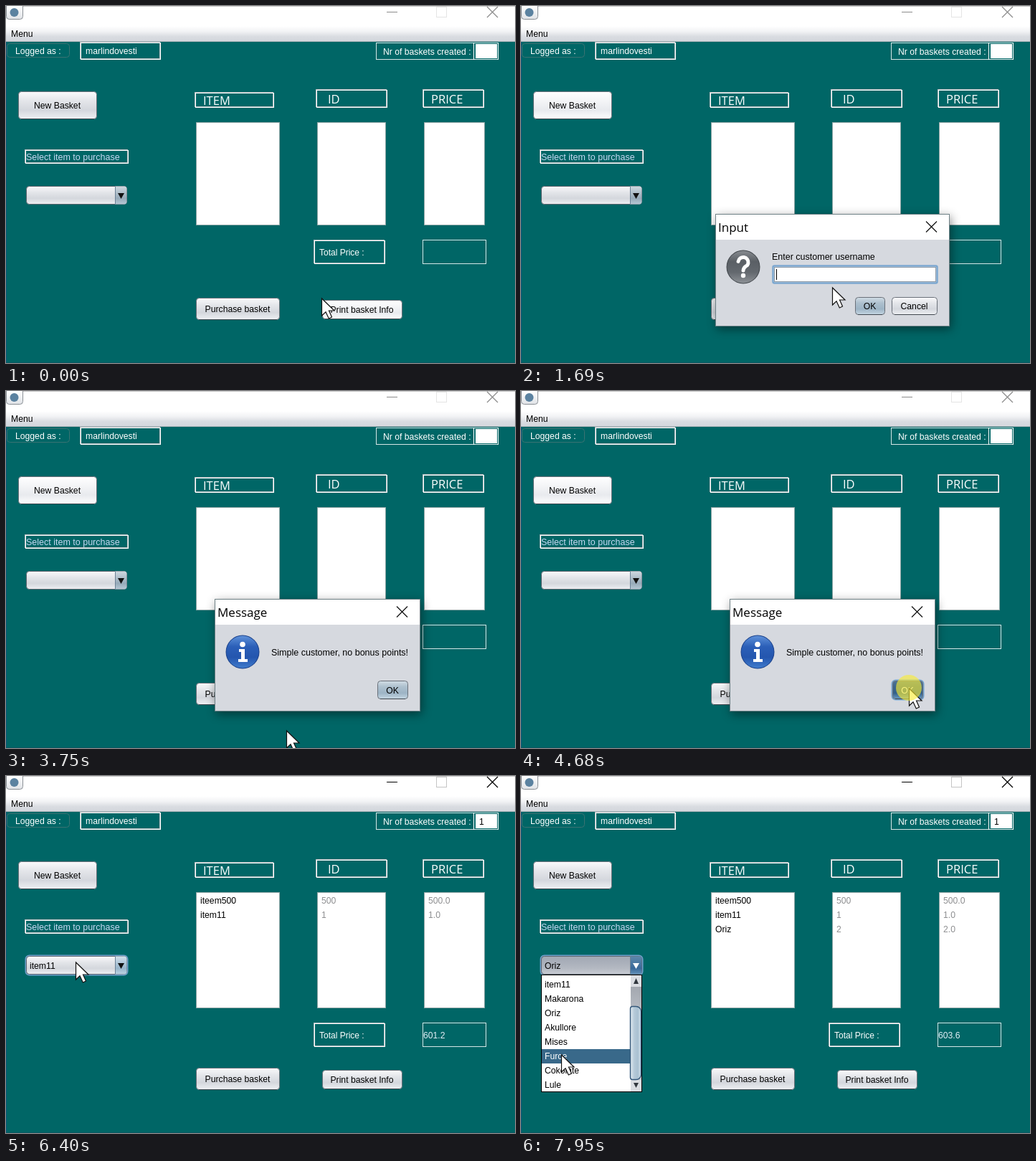
Recreate the animation shown at these times as an HTML page with a canvas. Size 710 px wide and 498 px high, loop 8 s.

```html
<!DOCTYPE html>
<html lang="en">
<head>
<meta charset="utf-8">
<title>Basket</title>
<style>
html, body { margin: 0; height: 100%; overflow: hidden; background: #066; }
canvas { display: block; }
</style>
</head>
<body>
<canvas id="stage" width="710" height="498"></canvas>
<script>
const W = 710, H = 498, LOOP = 8000;
const main = document.getElementById('stage').getContext('2d');
const layer = Object.assign(document.createElement('canvas'), { width: W, height: H }).getContext('2d');
let g = main;

const SANS = '"Liberation Sans", Arial, sans-serif';
const HEAD = '"Open Sans", "Noto Sans", sans-serif';
const TEAL = '#006666', BODY = '#d6d9df';
const LOOKS = {
  plain: ['#fbfbfc', '#e4e6ea', '#d4d7dd', '#eff1f4'],
  hover: ['#ffffff', '#f4f5f7', '#e8eaee', '#ffffff'],
  pressed: ['#a3a9b4', '#a9afba', '#b4b9c2', '#c8ccd4'],
  primary: ['#d3dee6', '#adc0ce', '#9db4c5', '#c7d8e4'],
  primaryDown: ['#4d7597', '#3c6489', '#33608a', '#6d9cc2'],
  arrow: ['#d0dae1', '#b3c2cd', '#96aab9', '#b9cbd8'],
  arrowFocus: ['#d5e2ec', '#b4cadb', '#98b5ca', '#bfd6e6'],
  arrowDown: ['#5f88ab', '#4d7aa2', '#39699a', '#6493bb']
};

// time, x, y of the pointer tip
const PATH = [
  [0, 440, 408], [70, 440, 408], [480, 86, 142], [600, 86, 143], [740, 88, 167], [900, 88, 167],
  [1690, 434, 393], [1910, 434, 393], [2760, 434, 398], [3300, 434, 398], [3800, 390, 476],
  [4500, 541, 415], [5000, 541, 415], [5630, 100, 263], [5720, 100, 264], [6130, 90, 331],
  [6190, 90, 331], [6360, 97, 260], [6540, 97, 260], [6790, 88, 371], [7020, 88, 371],
  [7340, 98, 262], [7500, 98, 263], [7730, 60, 380], [7900, 56, 389], [8000, 56, 389]
];
const CLICKS = [[490, 610], [4600, 4780], [5630, 5740], [6120, 6220], [6460, 6560], [6950, 7040], [7430, 7530]];
const POPUPS = [[5700, 6180], [6550, 7010], [7510, 8000]];
const ITEMS = ['iteem500', 'Buke', 'item11', 'Makarona', 'Oriz', 'Akullore', 'Mises', 'Furce', 'Cokolate', 'Lule'];
const BOUGHT = [
  { at: 4790, pick: 0, id: '500', price: '500.0', total: '600.0' },
  { at: 6190, pick: 2, id: '1', price: '1.0', total: '601.2' },
  { at: 7010, pick: 4, id: '2', price: '2.0', total: '603.6' }
];
const USER = 'nea', KEYS = [2060, 2295, 2530];

const within = (t, [a, b]) => t >= a && t < b;
const clamp = v => Math.max(0, Math.min(1, v));

function pointer(t) {
  const i = PATH.findIndex(p => p[0] > t), [t0, x0, y0] = PATH[i - 1], [t1, x1, y1] = PATH[i];
  const k = (t - t0) / (t1 - t0), e = k * k * (3 - 2 * k);
  return [Math.round(x0 + (x1 - x0) * e), Math.round(y0 + (y1 - y0) * e)];
}

function text(s, x, y, color = '#000', size = 12.2, family = SANS, align = 'left') {
  g.font = `${size}px ${family}`;
  g.textAlign = align;
  g.fillStyle = color;
  g.fillText(s, x, y);
}

function rect(x, y, w, h, color) {
  g.fillStyle = color;
  g.fillRect(x, y, w, h);
}

function frame(x, y, w, h, color) {
  g.strokeStyle = color;
  g.lineWidth = 1;
  g.strokeRect(x + .5, y + .5, w - 1, h - 1);
}

function etched(x, y, w, h) {
  frame(x, y, w - 1, h - 1, '#b4bcc0');
  frame(x + 1, y + 1, w - 1, h - 1, '#fff');
}

function shade(y, h, colors) {
  const grad = g.createLinearGradient(0, y, 0, y + h);
  colors.forEach((c, i) => grad.addColorStop(i / (colors.length - 1), c));
  return grad;
}

function rounded(x, y, w, h, r, fill, stroke, width = 1) {
  g.beginPath();
  g.roundRect(x + .5, y + .5, w - 1, h - 1, r);
  if (fill) { g.fillStyle = fill; g.fill(); }
  if (stroke) { g.strokeStyle = stroke; g.lineWidth = width; g.stroke(); }
}

function poly(points, fill, stroke) {
  g.beginPath();
  points.forEach(([x, y]) => g.lineTo(x, y));
  g.closePath();
  g.fillStyle = fill;
  g.fill();
  if (stroke) { g.strokeStyle = stroke; g.lineWidth = 1.2; g.stroke(); }
}

function disc(x, y, r, fill) {
  g.beginPath();
  g.arc(x, y, r, 0, 7);
  g.fillStyle = fill;
  g.fill();
}

function line(color, width, ...points) {
  g.beginPath();
  points.forEach(([x, y]) => g.lineTo(x, y));
  g.strokeStyle = color;
  g.lineWidth = width;
  g.stroke();
}

function cross(x, y, r, color) {
  line(color, 1.2, [x - r, y - r], [x + r, y + r]);
  line(color, 1.2, [x - r, y + r], [x + r, y - r]);
}

function button(label, x, y, w, h, look = 'plain', focus = false) {
  if (focus) rounded(x - 1, y - 1, w + 2, h + 2, 5, null, '#73a4d1', 2);
  rounded(x, y, w, h, 4, shade(y, h, LOOKS[look]), '#6a7079');
  line('#3f464e', 1, [x + 4, y + h - .5], [x + w - 4, y + h - .5]);
  text(label, x + w / 2 - .5, y + h / 2 + 4.5, look === 'primaryDown' ? '#fff' : '#000', 12.2, SANS, 'center');
}

function titleBar(active) {
  const ink = active ? '#000' : '#8c8c8c';
  rect(0, 0, W, 28, '#fff');
  rect(0, 0, W, 1, '#c6c6c6');
  rounded(0, -6, 24, 25, 4, shade(0, 19, ['#fff', '#dfe2e6']), '#8b9096');
  disc(11.5, 9, 6, '#5b82a0');
  rect(531, 8, 15, 1, ink);
  frame(600, 1, 15, 15, active ? '#c4c4c4' : '#e4e4e4');
  cross(678.5, 8.5, 7.5, ink);
  rect(0, 28, W, 22, shade(28, 22, ['#fff', '#f2f3f5', '#d9dce1', '#d3d6dc']));
  rect(0, 49, W, 1, '#a9b3b8');
  text('Menu', 7, 43);
}

function listBox(x, w, h, rows, color) {
  rect(x, 162, w, h, '#fff');
  frame(x, 162, w, h, '#8fa5a5');
  rows.forEach((s, i) => text(s, x + 6, 178 + 20 * i, color));
}

function combo(value, open, focus) {
  if (focus) rounded(27, 250, 143, 28, 5, null, '#6f9fcb', 2);
  rounded(28, 251, 141, 26, 4, shade(251, 26, LOOKS[open ? 'pressed' : 'plain']), '#5e656e');
  g.save();
  g.beginPath();
  g.roundRect(28.5, 251.5, 140, 25, 4);
  g.clip();
  rect(152, 251, 17, 26, shade(251, 26, LOOKS[open ? 'arrowDown' : focus ? 'arrowFocus' : 'arrow']));
  rect(152, 251, 1, 26, '#6c8296');
  g.restore();
  poly([[156, 261], [165, 261], [160.5, 269]], open ? '#fff' : '#111');
  text(value, 33, 269);
}

function popup(top, hot) {
  rect(28, 277, 141, 164, '#fff');
  for (let i = 0; i < 8; i++) {
    const on = i + top === hot;
    if (on) rect(29, 281 + 20 * i, 125, 20, '#39698a');
    text(ITEMS[i + top], 33, 295 + 20 * i, on ? '#fff' : '#000');
  }
  const y = 296 + top * 12.5;
  rect(153, 278, 15, 162, '#dadde2');
  rect(153, 294, 15, 130, shade(294, 130, ['#a3a8b0', '#c9cdd4', '#c9cdd4']));
  const sheen = g.createLinearGradient(153, 0, 168, 0);
  ['#dfe9f0', '#b5c9d8', '#a9c0d1', '#dceaf4'].forEach((c, i) => sheen.addColorStop(i / 3, c));
  rounded(152, y, 16, 103, [3, 7, 7, 3], sheen, '#35587a', 1.4);
  poly([[157, 290], [164, 290], [160.5, 282]], '#30363d');
  poly([[157, 428], [164, 428], [160.5, 435]], '#30363d');
  frame(28, 277, 141, 164, '#000');
}

// Draws a window on its own layer, then blends it in while it grows to full size
function dialog(p, x, y, w, h, title, content) {
  if (p <= 0) return;
  g = layer;
  g.clearRect(0, 0, W, H);
  rect(x, y, w, h, BODY);
  rect(x, y, w, 36, '#fff');
  frame(x, y, w, h, '#6f8186');
  text(title, x + 4, y + 25, '#000', 17, HEAD);
  cross(x + w - 25.5, y + 18, 7.5, '#111');
  content();
  g = main;
  const s = .95 + .05 * p, cx = x + w / 2, cy = y + h / 2;
  g.save();
  g.globalAlpha = p;
  g.shadowColor = 'rgba(0,0,0,.45)';
  g.shadowBlur = 14;
  g.shadowOffsetX = 2;
  g.shadowOffsetY = 4;
  g.translate(cx, cy);
  g.scale(s, s);
  g.drawImage(layer.canvas, -cx, -cy);
  g.restore();
}

function badge(x, y, colors, rim) {
  disc(x, y, 23.5, rim);
  disc(x, y, 22.5, shade(y - 22, 44, colors));
}

function inputContent(t) {
  badge(310, 364, ['#85898e', '#5a5f65', '#63686e', '#8b8f94'], '#43484d');
  g.lineCap = 'round';
  g.beginPath();
  g.arc(310, 357.5, 7, Math.PI * 1.05, Math.PI * 2.2);
  g.quadraticCurveTo(310, 365, 310, 369);
  g.strokeStyle = '#fff';
  g.lineWidth = 5;
  g.stroke();
  g.lineCap = 'butt';
  disc(310, 376, 3.2, '#fff');
  text('Enter customer username', 350, 354, '#000', 12.5);
  rounded(351, 362, 230, 25, 2, '#fff', '#7ba7d0', 2.5);
  frame(353, 364, 226, 21, '#8d99a5');
  const typed = USER.slice(0, KEYS.filter(k => t >= k).length);
  text(typed, 356, 378);
  rect(356 + Math.round(g.measureText(typed).width), 367, 1, 15, '#000');
  button('OK', 466, 406, 42, 25, 'primary');
  button('Cancel', 517, 406, 64, 25);
}

function messageContent(t) {
  badge(330, 364, ['#5c8fd8', '#2b5fb8', '#2456ae', '#3f7acb'], '#1d438c');
  disc(330, 353.5, 3.8, '#fff');
  rect(325, 360, 8, 4, '#fff');
  rect(328, 360, 5, 17, '#fff');
  rect(324, 374, 13, 4, '#fff');
  text('Simple customer, no bonus points!', 370, 369, '#000', 12.5);
  button('OK', 518, 404, 43, 26, t > 4590 ? 'primaryDown' : 'primary', t > 4400);
}

function draw(t) {
  const input = Math.min(clamp((t - 580) / 200), clamp((3100 - t) / 110));
  const message = Math.min(clamp((t - 3090) / 200), clamp((4870 - t) / 90));
  const active = within(t, [70, 620]) || within(t, [3000, 3130]) || t >= 4790;
  const bought = BOUGHT.filter(b => t >= b.at);
  const last = bought[bought.length - 1];
  const open = POPUPS.some(p => within(t, p));
  const grow = last ? 18 : 0;
  const [px, py] = pointer(t);

  rect(0, 0, W, H, TEAL);
  rect(0, 50, 1, H, '#0a5578');
  rect(0, H - 1, W, 1, '#0a5560');
  titleBar(active);

  rounded(1, 52, 88, 20, 4, null, '#3a7272');
  text('Logged as :', 13, 67, '#fff');
  etched(103, 50, 113, 25);
  text('marlindovesti', 111, 67, '#fff');
  frame(516, 51, 171, 24, '#d5e6e6');
  text('Nr of baskets created :', 526, 68, '#fff');
  rect(652, 51, 1, 24, '#fff');
  rect(655, 53, 30, 20, '#fff');
  frame(686, 51, 1, 24, '#fff');
  if (last) text('1', 660, 68);

  const newLook = within(t, [490, 610]) ? 'pressed' : within(t, [420, 4790]) ? 'hover' : 'plain';
  button('New Basket', 17, 119, 110, 39, newLook, within(t, [500, 640]) || within(t, [4850, 5690]));
  etched(26, 200, 145, 20);
  text('Select item to purchase', 28, 215, '#c6d8f2', 12.5);
  combo(last ? ITEMS[last.pick] : '', open, t >= 5690);

  etched(263, 120, 111, 22);
  text('ITEM', 275, 138, '#fff', 16.5, HEAD);
  etched(432, 116, 100, 26);
  text('ID', 449, 136, '#fff', 16.5, HEAD);
  etched(581, 116, 86, 26);
  text('PRICE', 593, 136, '#fff', 16.5, HEAD);

  const tall = 144 + grow;
  listBox(265, 117, tall, bought.map(b => ITEMS[b.pick]), '#000');
  listBox(434, 96, tall, bought.map(b => b.id), '#8e8f91');
  listBox(583, 85, tall, bought.map(b => b.price), '#8e8f91');

  etched(429, 326 + grow, 100, 34);
  text('Total Price :', 437, 348 + grow, '#fff', 12);
  frame(581, 326 + grow, 89, 34, '#d5e6e6');
  if (last) text(last.total, 582, 366, '#e4eef6');

  button('Purchase basket', 265, 407, 117, 31);
  button('Print basket Info', 441, 410, 112, 27, t < 110 ? 'hover' : 'plain');

  if (open) {
    const top = t < 7790 ? 0 : t < 7880 ? 1 : 2;
    popup(top, py > 281 ? Math.floor((py - 281) / 20) + top : last.pick);
  }

  dialog(input, 271, 290, 327, 157, 'Input', () => inputContent(t));
  dialog(message, 291, 290, 287, 157, 'Message', () => messageContent(t));

  const arrow = [[0, 0], [0, 24], [5.5, 18.7], [9.8, 28], [14, 26], [10, 17], [17.5, 17]];
  poly(arrow.map(([x, y]) => [px + x + .5, py + y]), '#fff', '#111');
  if (CLICKS.some(c => within(t, c))) disc(px, py - 1, 18, 'rgba(250,238,50,.62)');
}

const start = performance.now();
function tick() {
  draw((performance.now() - start) % LOOP);
  requestAnimationFrame(tick);
}
tick();
</script>
</body>
</html>
```
